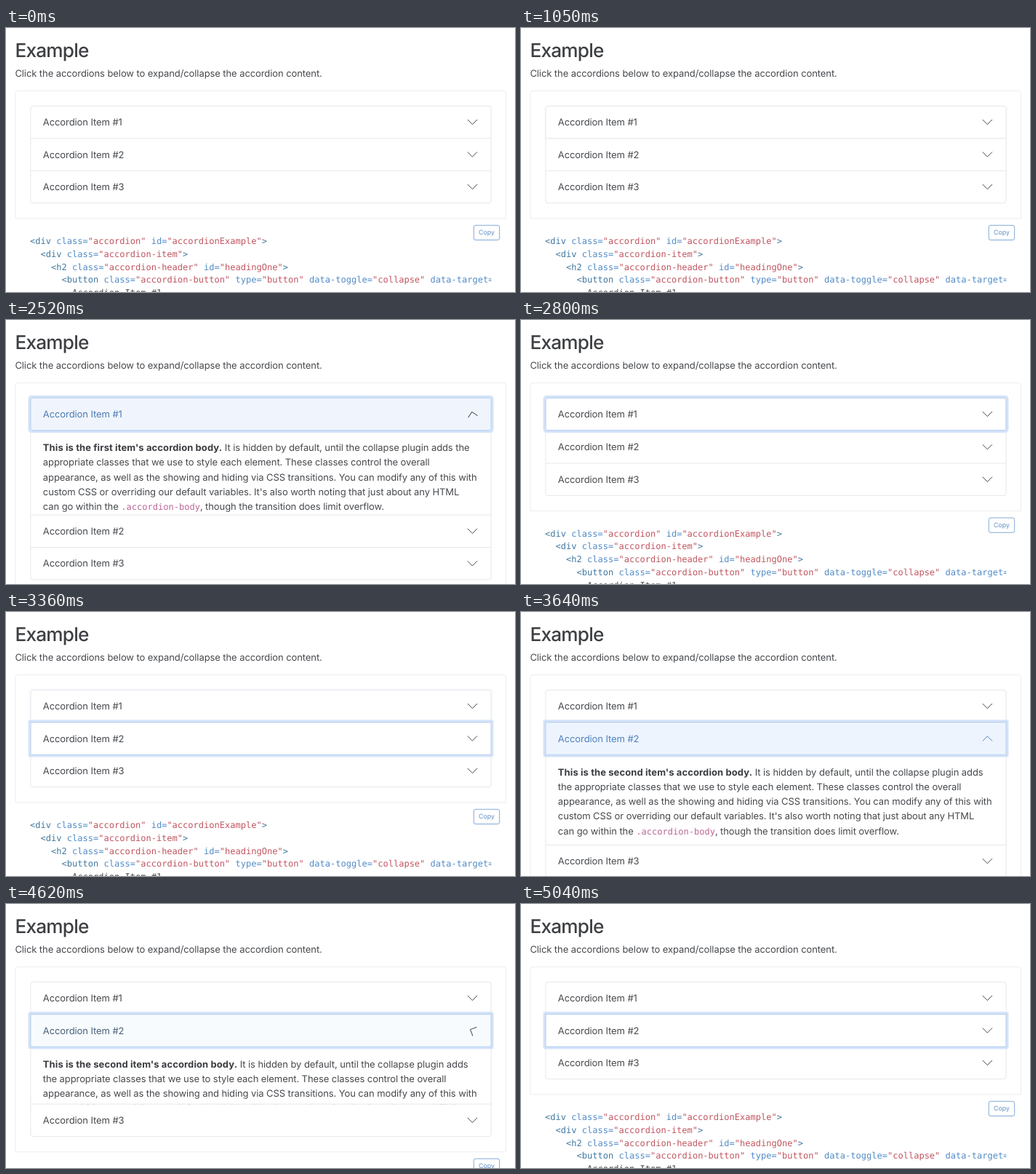
Recreate the animation shown at these times as an HTML page. Size 700 by 363 pixels, loop 5.11 s.

```html
<!DOCTYPE html>
<html lang="en">
<head>
<meta charset="utf-8">
<title>Accordion example</title>
<style>
  html, body { margin: 0; width: 100%; height: 100%; overflow: hidden; background: #fff; }
  svg { display: block; }
  text {
    font: 13px Inter, "Open Sans", sans-serif;
    font-optical-sizing: none;
    letter-spacing: -.088px;
    text-rendering: geometricPrecision;
    fill: #46494d;
    white-space: pre;
  }
  .title { font-size: 26.2px; font-weight: 550; letter-spacing: -.78px; fill: #3d3f43; }
  .strong { font-weight: 700; letter-spacing: .1px; fill: #3a3d41; }
  .mono, .inline { font-family: "DejaVu Sans Mono", monospace; letter-spacing: 0; }
  .mono { font-size: 12.04px; }
  .inline { font-size: 12.04px; fill: #bb6496; }
  .tag { fill: #41789f; }
  .attr { fill: #528bc6; }
  .str { fill: #c05560; }
  .copy { font-size: 8.8px; letter-spacing: 0; text-anchor: middle; fill: #5f90c6; }
  .line { fill: none; stroke: #e3e3e3; stroke-width: .85; }
  .frame { stroke: #e7e9eb; }
  .button { fill: #fff; stroke: #6c9bcf; stroke-width: .85; }
  .active { fill: #eef4fd; }
  .ring { fill: none; stroke: #d4e2f8; stroke-width: 3; }
  .edge { fill: none; stroke: #a5c7f1; stroke-width: .85; }
  .chevron { fill: none; stroke-width: 1; stroke-linecap: round; stroke-linejoin: round; }
</style>
</head>
<body>
<svg id="stage" width="700" height="363" viewBox="0 0 700 363"></svg>
<script>
const LOOP = 5110, STEP = 70;
const LEFT = 33.9, WIDTH = 633.2, TOP = 107.2, HEADER = 44.5, BODY = 128.6;
const LINE = 20.3, CODE_LINE = 17.77, CODE_CHAR = 7.25;
const DARK = [70, 73, 77], BLUE = [78, 130, 190];

// Times in ms: focus follows the press, open and close follow the release.
const items = [
  { focus: 1030, blur: 3240, open: 1153, close: 2485 },
  { focus: 3240, blur: Infinity, open: 3372, close: 4536 },
  { focus: Infinity, blur: Infinity, open: Infinity, close: Infinity }
];

const shared = [
  "appearance, as well as the showing and hiding via CSS transitions. You can modify any of this with",
  "custom CSS or overriding our default variables. It's also worth noting that just about any HTML",
  'can go within the <tspan class="inline">.accordion-body</tspan>, though the transition does limit overflow.'
];
const strong = text => `<tspan class="strong">${text}</tspan>`;
const bodies = [
  [strong("This is the first item's accordion body.") + " It is hidden by default, until the collapse plugin adds the",
   "appropriate classes that we use to style each element. These classes control the overall", ...shared],
  [strong("This is the second item's accordion body.") + " It is hidden by default, until the collapse plugin adds",
   "the appropriate classes that we use to style each element. These classes control the overall", ...shared],
  []
];

const code = [
  '<div class="accordion" id="accordionExample">',
  '  <div class="accordion-item">',
  '    <h2 class="accordion-header" id="headingOne">',
  '      <button class="accordion-button" type="button" data-toggle="collapse" data-target=',
  '        Accordion Item #1'
];

function highlight(line) {
  if (line[0] !== "<") return line;
  return line.replace(/<\w+|>|"[^"]*"|[\w-]+=/g, token => {
    const kind = /^[<>]/.test(token) ? "tag" : token[0] === '"' ? "str" : "attr";
    return `<tspan class="${kind}">${token.replace("<", "&lt;").replace(">", "&gt;")}</tspan>`;
  });
}

const codeText = code.map((line, i) => {
  const source = line.trimStart();
  const x = 33 + (line.length - source.length) * CODE_CHAR;
  return `<text class="mono" x="${x}" y="${297 + i * CODE_LINE}">${highlight(source)}</text>`;
}).join("");

const itemMarkup = (item, i) => `
  <g class="item">
    <svg class="body" y="${HEADER}" width="700" height="0">
      ${bodies[i].map((line, n) => `<text x="50.8" y="${28.4 + n * LINE}">${line}</text>`).join("")}
    </svg>
    <rect class="active" x="${LEFT}" width="${WIDTH}" height="${HEADER}" rx="${i ? 0 : 3}"/>
    ${i ? `<path class="line" d="M${LEFT} 0h${WIDTH}"/>` : ""}
    <g class="focus">
      <rect class="ring" x="${LEFT - 1.9}" y="-1.9" width="${WIDTH + 3.8}" height="${HEADER + 3.8}" rx="${i ? 1 : 3}"/>
      <rect class="edge" x="${LEFT}" width="${WIDTH}" height="${HEADER}" rx="${i ? 0 : 3}"/>
    </g>
    <text class="label" x="50.8" y="26.9">Accordion Item #${i + 1}</text>
    <path class="chevron" d="M-6.3 -3.2L0 3.2L6.3 -3.2"/>
  </g>`;

const stage = document.getElementById("stage");
stage.innerHTML = `
  <clipPath id="codeArea"><rect x="33" y="262" width="634.5" height="200"/></clipPath>
  <text class="title" x="12.4" y="40.1">Example</text>
  <text x="12.4" y="67.2">Click the accordions below to expand/collapse the accordion content.</text>
  <path id="frame" class="line frame"/>
  <rect id="outline" class="line" x="${LEFT}" y="${TOP}" width="${WIDTH}" rx="3.2"/>
  ${items.map(itemMarkup).reverse().join("")}
  <g id="below">
    <g clip-path="url(#codeArea)">${codeText}</g>
    <rect class="button" x="643.3" y="271.3" width="35.4" height="20.2" rx="2.6"/>
    <text class="copy" x="661" y="284.3">Copy</text>
  </g>`;

const frame = document.getElementById("frame");
const outline = document.getElementById("outline");
const below = document.getElementById("below");
const views = [...stage.querySelectorAll(".item")].reverse().map(root => {
  const part = name => root.querySelector("." + name);
  return { root, body: part("body"), active: part("active"), focus: part("focus"),
           label: part("label"), chevron: part("chevron") };
});

function bezier(x1, y1, x2, y2) {
  const at = (a, b, s) => 3 * a * s * (1 - s) ** 2 + 3 * b * s * s * (1 - s) + s ** 3;
  return x => {
    if (x <= 0) return 0;
    if (x >= 1) return 1;
    let low = 0, high = 1;
    for (let i = 0; i < 24; i++) {
      const mid = (low + high) / 2;
      if (at(x1, x2, mid) < x) low = mid; else high = mid;
    }
    return at(y1, y2, low);
  };
}
const ease = bezier(.25, .1, .25, 1);
const easeInOut = bezier(.42, 0, .58, 1);

// Rises from 0 to 1 at `on` and falls back at `off`.
const pulse = (t, on, off, duration, curve) =>
  curve((t - on) / duration) - curve((t - off) / duration);

const mix = (a, b, k) => `rgb(${a.map((v, i) => Math.round(v + (b[i] - v) * k))})`;

function draw(t) {
  let shift = 0;
  items.forEach(({ focus, blur, open, close }, i) => {
    const view = views[i];
    const height = BODY * pulse(t, open, close, 350, ease);
    const tint = pulse(t, open, close, 150, easeInOut);
    const turn = 180 * pulse(t, open, close, 200, easeInOut);
    const isOpen = t >= open && t < close;

    view.root.setAttribute("transform", `translate(0 ${TOP + i * HEADER + shift})`);
    view.body.setAttribute("height", height);
    view.active.style.opacity = tint;
    view.focus.style.opacity = pulse(t, focus, blur, 150, easeInOut);
    view.label.style.fill = mix(DARK, BLUE, tint);
    view.chevron.style.stroke = mix(DARK, BLUE, isOpen ? 1 : 0);
    view.chevron.setAttribute("transform", `translate(641.4 ${HEADER / 2}) rotate(${turn})`);
    shift += height;
  });
  outline.setAttribute("height", 3 * HEADER + shift);
  frame.setAttribute("d", `M12.9 ${261.9 + shift}V89.6q0 -3.2 3.2 -3.2H684.4q3.2 0 3.2 3.2V${261.9 + shift}Z`);
  below.setAttribute("transform", `translate(0 ${shift})`);
}

const start = performance.now();
function tick() {
  const t = (performance.now() - start) % LOOP;
  draw(Math.floor(t / STEP) * STEP);
  requestAnimationFrame(tick);
}
tick();
</script>
</body>
</html>
```
